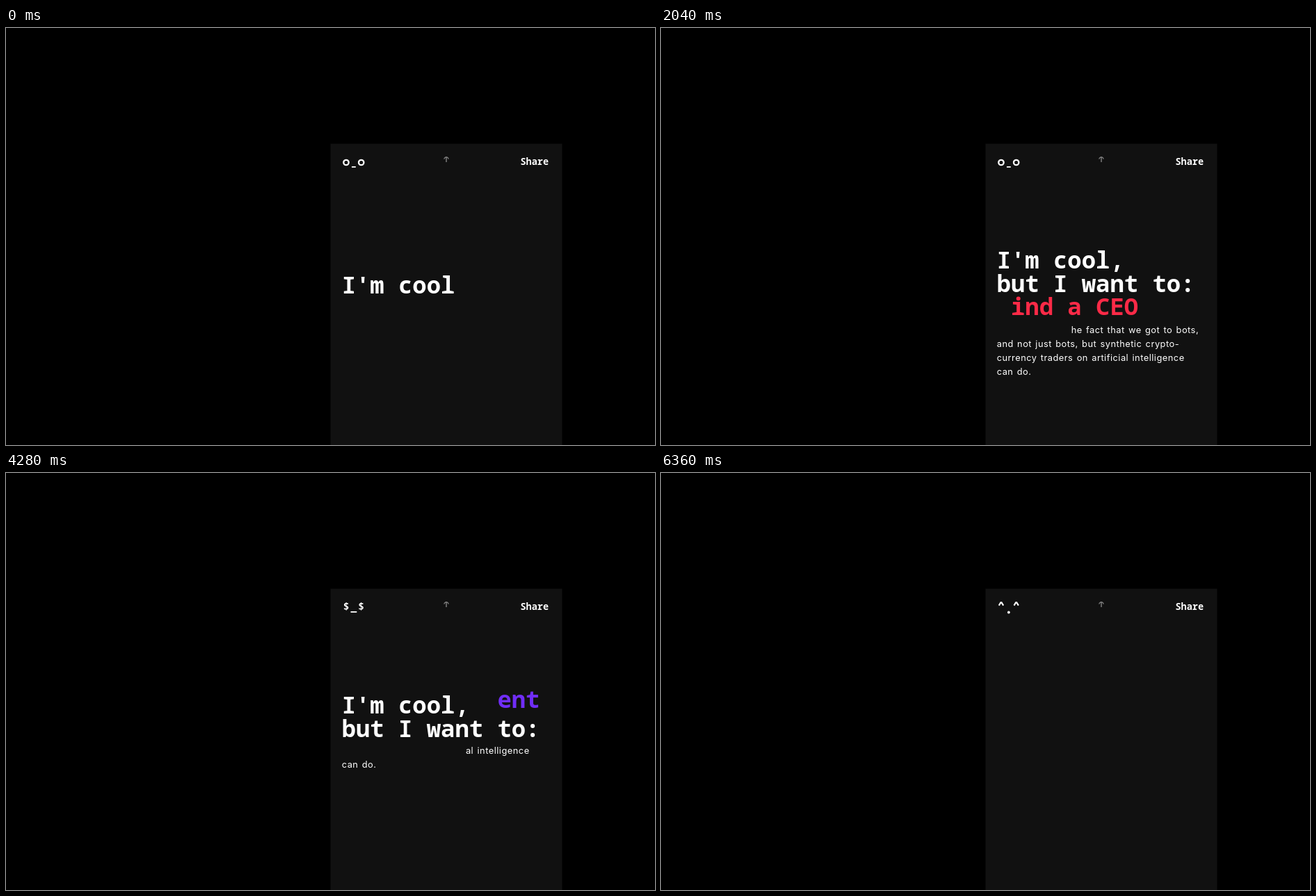
Recreate the animation shown at these times as an HTML page with a canvas. Size 933 by 600 pixels, loop 6.48 s.

```html
<!DOCTYPE html>
<html lang="en">
<head>
<meta charset="utf-8">
<title>I'm cool</title>
<style>
  html, body { margin: 0; width: 100%; height: 100%; overflow: hidden; background: #000; }
  canvas { display: block; }
</style>
</head>
<body>
<canvas id="stage" width="933" height="600"></canvas>
<script>
const ctx = document.getElementById('stage').getContext('2d');
const LOOP = 6480, CYCLE = 2000, LEAVE = 1000 / 3;
const MONO = '"Space Mono", "Noto Sans Mono", monospace';
const SANS = '"Work Sans", Inter, sans-serif';
const WHITE = '#fff', LEFT = 482.7;

const TITLE = { font: `bold 33.9px ${MONO}`, gap: '0px', space: '0px', step: 34 };
const BODY = { font: `12.85px ${SANS}`, gap: '0.48px', space: '1.2px', step: 20 };

const heading = ["I'm cool, ", 'but I want to: '];
const body = [
  'The text about the fact that we got to bots,',
  'and not just bots, but synthetic crypto-',
  'currency traders on artificial intelligence',
  'can do.'
];
const goals = [
  { text: ['find a CEO'], color: '#fc2a47', eyes: 'o' },
  { text: ['get investment'], color: '#702df6', eyes: '$' },
  { text: ['be better'], color: WHITE, eyes: '^' }
];

const clamp = x => Math.min(1, Math.max(0, x));
const smooth = x => x * x * (3 - 2 * x);
const size = lines => lines.join('').length;
const typed = (n, p) => Math.ceil(n * clamp(p) - 1e-6);
const erased = (n, p) => Math.floor(n * clamp(p) + 1e-6);
const lift = t => t > 0 ? 96 * (1 - Math.cos(Math.PI * Math.min(t, 640) / 640)) : 0;

// Draws only characters from..to, each at its place in the full line.
function drawLines(lines, style, y, color, from, to) {
  ctx.font = style.font;
  ctx.letterSpacing = style.gap;
  ctx.wordSpacing = style.space;
  ctx.fillStyle = color;
  let start = 0;
  lines.forEach((line, i) => {
    const a = Math.max(0, from - start), b = Math.min(line.length, to - start);
    if (b > a) {
      const x = LEFT + ctx.measureText(line.slice(0, a)).width;
      ctx.fillText(line.slice(a, b), x, y + i * style.step);
    }
    start += line.length;
  });
  ctx.letterSpacing = ctx.wordSpacing = '0px';
}

function line(points, width, color) {
  ctx.beginPath();
  points.forEach(([x, y]) => ctx.lineTo(x, y));
  ctx.lineWidth = width;
  ctx.strokeStyle = color;
  ctx.stroke();
}

function drawFace(eyes, smiling) {
  ctx.fillStyle = ctx.strokeStyle = WHITE;
  for (const x of [489, 510.7]) {
    if (eyes === 'o') {
      ctx.beginPath();
      ctx.arc(x, 193.5, 3.7, 0, 7);
      ctx.lineWidth = 2.3;
      ctx.stroke();
    } else if (eyes === '$') {
      ctx.font = `bold 14.5px ${MONO}`;
      ctx.fillText('$', x - 4.35, 196.7);
    } else {
      line([[x - 3.2, 190.6], [x - 0.6, 186.4], [x + 0.6, 186.4], [x + 3.2, 190.6]], 2.1, WHITE);
    }
  }
  if (smiling) {
    ctx.beginPath();
    ctx.arc(499.9, 198.2, 2.3, 0.3, Math.PI - 0.3);
    ctx.lineWidth = 1.6;
    ctx.stroke();
  } else if (eyes === '^') {
    ctx.beginPath();
    ctx.arc(499.9, 200.5, 1.9, 0, 7);
    ctx.fill();
  } else {
    const half = eyes === 'o' ? 2.9 : 4.4;
    ctx.fillRect(499.9 - half, 199, half * 2, 1.8);
  }
}

function drawBar() {
  const gray = '#8c8c8c';
  line([[633, 185.5], [633, 193]], 1.3, gray);
  line([[629.8, 188.6], [630.4, 187], [632, 185.8], [634, 185.8], [635.6, 187], [636.2, 188.6]], 1.2, gray);
  ctx.font = `bold 13.5px ${MONO}`;
  ctx.fillStyle = WHITE;
  ctx.fillText('Share', 739.5, 196.5);
}

function draw(t) {
  ctx.fillStyle = '#000';
  ctx.fillRect(0, 0, 933, 600);
  ctx.fillStyle = '#111';
  ctx.fillRect(466.5, 166.5, 333, 434);

  const i = t < 2500 ? 0 : t < 4500 ? 1 : 2;
  const goal = goals[i], local = t - i * CYCLE;
  const talkStart = i ? 500 : 0, talkEnd = i === 2 ? 1550 : 1510;
  const talking = local >= talkStart && local < talkEnd;
  const smiling = talking && Math.floor((local - talkStart) / 160) % 2 === 1;

  drawFace(goal.eyes, smiling);
  drawBar();

  const gone = (local - 2000) / LEAVE, up = lift(local - 2000);

  const total = size(heading), last = i === 2;
  const headY = 346 + 36 * (1 - smooth(clamp(t / 500))) - (last ? up * 0.72 : 0);
  drawLines(heading, TITLE, headY, WHITE,
    last ? erased(total, gone) : 0, 8 + typed(total - 8, t / 500));

  const n = size(goal.text), m = size(body);
  drawLines(goal.text, TITLE, 414.8 - up, goal.color, erased(n, gone), typed(n, (local - 500) / 500));
  drawLines(body, BODY, 441 - up, WHITE, erased(m, gone), typed(m, (local - 1000) / 500));
}

const begin = performance.now();
function tick() {
  const t = (performance.now() - begin) % LOOP;
  draw(Math.floor(t / 40) * 40);
  requestAnimationFrame(tick);
}
tick();
</script>
</body>
</html>
```
